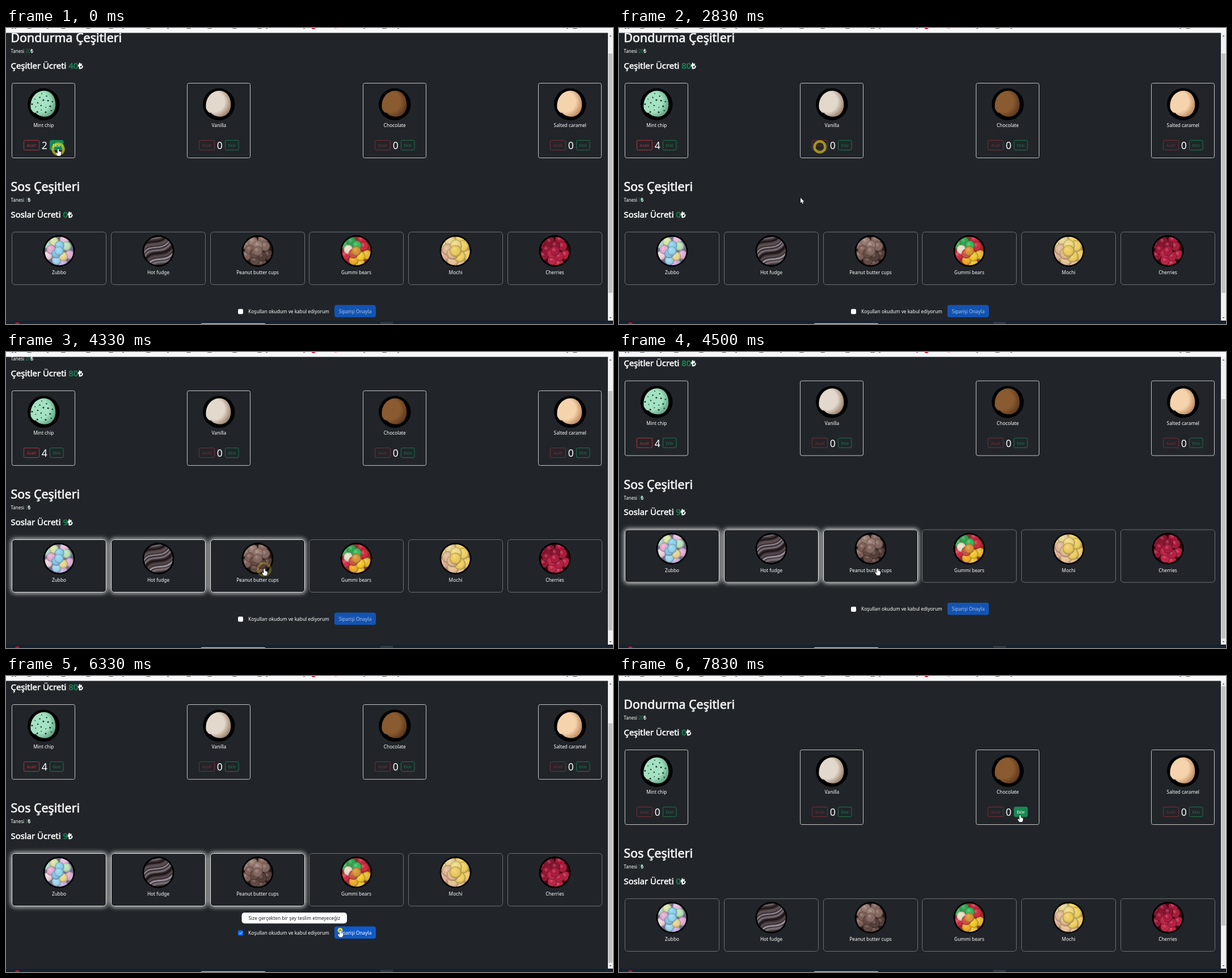
Write an HTML page with a canvas that moves like this. It is 1070 px wide and 523 px high and loops after 8000 ms.

```html
<!DOCTYPE html>
<html lang="tr">
<head>
<meta charset="utf-8">
<title>Dondurma Çeşitleri</title>
<style>
html, body { margin: 0; width: 100%; height: 100%; overflow: hidden; background: #212529; }
canvas { display: block; }
</style>
</head>
<body>
<canvas id="stage" width="1070" height="523"></canvas>
<script>
const ctx = document.getElementById('stage').getContext('2d');
const LOOP = 8000, STEPS = 48, RESET = 40;
const BG = '#212529', GREEN = '#198754', RED = '#dc3545';

const scoops = [
  { name: 'Mint chip', light: '#a3e2c2', dark: '#4f9273', chips: true },
  { name: 'Vanilla', light: '#e2d8cc', dark: '#85684c' },
  { name: 'Chocolate', light: '#8a5a30', dark: '#4f2f17' },
  { name: 'Salted caramel', light: '#f5d3ad', dark: '#ad7444' }
];
// Blob colours run along a spiral from the centre outwards.
const sauces = [
  { name: 'Zubbo', size: 8.2, base: '#6d6a8c', blobs: ['#8fd3ee', '#7fbfe6', '#86cfee', '#e9d48a', '#e6a9cf', '#b9dfb4', '#9fd3ee', '#d9e3a2', '#dfa6d6', '#ead0dc', '#e3b9d8', '#c7a9e0', '#a9d8c4'] },
  { name: 'Hot fudge', base: '#40363a' },
  { name: 'Peanut butter cups', size: 8.8, base: '#2a1b18', blobs: ['#80625a', '#5c403a', '#94766c', '#4d342f', '#7a594f'] },
  { name: 'Gummi bears', size: 8.5, base: '#a02a2a', blobs: ['#d8902e', '#d04a38', '#2fb552', '#f2c81e', '#e6dcc4', '#d02235', '#f0a81c', '#2a9d48', '#e2b52c', '#d0233a', '#c41f38', '#e8c028', '#3cb45a'] },
  { name: 'Mochi', size: 10.5, base: '#a87c48', blobs: ['#ecca58', '#e6b98a', '#efd67c', '#f0cf5c', '#dfb48e', '#eece5a', '#e8c090', '#e4cf8c', '#edc95c', '#dda88c'] },
  { name: 'Cherries', size: 8.5, base: '#43030f', blobs: ['#ab0f33', '#c01a3e', '#860926', '#b51439', '#98092b'] }
];

// Pointer keys: step, x, y
const path = [
  [0, 92, 214], [4, 91, 213], [5, 200, 214], [6, 330, 212], [7, 397, 208], [9, 396, 207],
  [10, 388, 207], [11, 366, 212], [12, 356, 210], [16, 354, 210], [17, 320, 300], [18, 270, 395],
  [20, 143, 397], [21, 190, 398], [22, 344, 400], [23, 440, 395], [24, 455, 384], [28, 456, 382],
  [30, 420, 452], [32, 413, 453], [34, 450, 455], [37, 588, 450], [39, 590, 449], [40, 690, 360],
  [41, 711, 331], [42, 711, 331], [43, 755, 340], [45, 725, 270], [46, 707, 246]
];
const clicks = [-1, 2, 4, 7, 9, 10, 12, 14, 16, 18, 20, 24, 31, 38];

function pointer(step) {
  const next = path.findIndex(p => p[0] >= step);
  if (next <= 0) return path[next < 0 ? path.length - 1 : 0].slice(1);
  const [a, ax, ay] = path[next - 1], [b, bx, by] = path[next];
  const f = (step - a) / (b - a);
  return [ax + (bx - ax) * f, ay + (by - ay) * f];
}

const passed = (step, ...marks) => marks.filter(m => m <= step).length;

function scrollAt(step) {
  if (step >= RESET) return 0;
  return step < 26 ? 33 : step === 26 ? 62 : step === 27 ? 79.5 : 80;
}

function stateAt(step) {
  const done = step >= RESET;
  return {
    counts: done ? [0, 0, 0, 0] : [2 + passed(step, 2, 4), passed(step, 7, 9, 10) - passed(step, 12, 14, 16), 0, 0],
    picked: [22, 19, 24].map(s => !done && step >= s),
    agreed: !done && step >= 32,
    tip: step >= 31 && step < RESET
  };
}

function box(x, y, w, h, r, fill, stroke) {
  ctx.beginPath();
  ctx.roundRect(x, y, w, h, r);
  if (fill) { ctx.fillStyle = fill; ctx.fill(); }
  if (stroke) { ctx.strokeStyle = stroke; ctx.stroke(); }
}

function disc(x, y, r, fill) {
  ctx.beginPath();
  ctx.arc(x, y, r, 0, 7);
  ctx.fillStyle = fill;
  ctx.fill();
}

function text(str, x, y, size, color = '#fff', align = 'left', weight = 0) {
  ctx.font = `${size}px "Noto Sans", "Open Sans", sans-serif`;
  ctx.textAlign = align;
  ctx.fillStyle = ctx.strokeStyle = color;
  ctx.fillText(str, x, y);
  if (weight) {
    ctx.lineWidth = weight;
    ctx.strokeText(str, x, y);
    ctx.lineWidth = 1;
  }
  return x + ctx.measureText(str).width;
}

function price(label, value, y, size, weight) {
  let x = text(label + ' ', 8.5, y, size, '#fff', 'left', weight);
  x = text(value, x, y, size, GREEN, 'left', weight);
  text('₺', x, y, size, '#fff', 'left', weight + 0.3);
}

const heading = (str, y) => text(str, 8.5, y, 21.4, '#f6f6f6', 'left', 0.7);

function at(x, y, draw) {
  ctx.save();
  ctx.translate(x, y);
  draw();
  ctx.restore();
}

const spiral = (i, spread) => {
  const a = i * 2.4, r = spread * Math.sqrt(i);
  return [r * Math.cos(a), r * Math.sin(a)];
};

function drawScoop({ light, dark, chips }) {
  disc(0, 0, 28.3, '#000');
  const shade = ctx.createRadialGradient(-9, -5, 8, -7, -4, 33);
  shade.addColorStop(0, light);
  shade.addColorStop(0.4, light);
  shade.addColorStop(1, dark);
  ctx.beginPath();
  ctx.moveTo(-22.5, 8);
  ctx.bezierCurveTo(-25, -12, -12, -24, 1, -24);
  ctx.bezierCurveTo(15, -24, 22, -10, 21, 3);
  ctx.bezierCurveTo(20, 15, 12, 22, 2, 22);
  ctx.bezierCurveTo(-6, 22, -12, 18, -14, 15);
  ctx.bezierCurveTo(-18, 16, -20, 12, -22.5, 8);
  ctx.fillStyle = shade;
  ctx.fill();
  if (chips) for (let i = 1; i < 18; i++) {
    const [x, y] = spiral(i, 4.7);
    disc(x - 1, y - 1, 0.9 + i % 3 * 0.3, '#1d3a30');
  }
}

function drawSauce({ base, blobs, size }) {
  disc(0, 0, 28, '#000');
  ctx.beginPath();
  ctx.arc(0, 0, 25.2, 0, 7);
  ctx.clip();
  ctx.fillStyle = base;
  ctx.fillRect(-28, -28, 56, 56);
  if (blobs) {
    for (let i = 12; i >= 0; i--) {
      const [x, y] = spiral(i, 7);
      const gloss = ctx.createRadialGradient(x - size * 0.3, y - size * 0.4, 0, x, y, size);
      gloss.addColorStop(0, 'rgba(255,255,255,.3)');
      gloss.addColorStop(0.55, 'rgba(255,255,255,0)');
      gloss.addColorStop(1, 'rgba(0,0,0,.35)');
      disc(x, y, size, blobs[i % blobs.length]);
      disc(x, y, size, gloss);
    }
    return;
  }
  ctx.rotate(-0.35);
  for (let i = 0; i < 10; i++) {
    const y = -25 + i * 5.5;
    ctx.beginPath();
    ctx.moveTo(-28, y + 6);
    ctx.bezierCurveTo(-10, y - 14, 4, y + 16, 28, y - 4);
    ctx.lineWidth = 2 + i % 3;
    ctx.strokeStyle = ['#756c73', '#211819', '#5a4e51', '#969098'][i % 4];
    ctx.stroke();
  }
}

function drawButton(label, x, color, hot, enabled) {
  const w = label === 'Ekle' ? 23.5 : 27;
  ctx.globalAlpha = !enabled ? 0.45 : hot ? 1 : 0.8;
  box(x, 231.5, w, 17, 2, hot && enabled && color, color);
  text(label, x + w / 2, 243.1, 7.25, hot && enabled ? '#fff' : color, 'center');
  ctx.globalAlpha = 1;
}

const inside = ([px, py], x, y, w, h) => px >= x && px <= x + w && py >= y && py <= y + h;
const scoopX = i => 10.5 + Math.round(i * 309.3);
const sauceX = i => 10.5 + Math.round(i * 174.75);

function clickable(p) {
  return scoops.some((s, i) => inside(p, scoopX(i) + 21, 232, 27, 17) || inside(p, scoopX(i) + 67, 232, 24, 17)) ||
    sauces.some((s, i) => inside(p, sauceX(i), 393, 166, 94)) ||
    inside(p, 408, 522, 244, 22);
}

function drawPage(state, hover) {
  heading('Dondurma Çeşitleri', 57.7);
  price('Tanesi', 20, 77, 8, 0);
  price('Çeşitler Ücreti', 20 * state.counts.reduce((a, b) => a + b), 104.6, 14.9, 0.55);
  scoops.forEach((scoop, i) => {
    const x = scoopX(i), n = state.counts[i];
    box(x, 130.5, 111, 132, 3, null, '#c4c5c6');
    at(x + 55.8, 167.8, () => drawScoop(scoop));
    text(scoop.name, x + 55.8, 208, 8.31, '#fff', 'center');
    drawButton('Azalt', x + 21, RED, inside(hover, x + 21, 232, 27, 17), n > 0);
    text(n, x + 57.3, 247.3, 17.5, '#fff', 'center');
    drawButton('Ekle', x + 67, GREEN, inside(hover, x + 67, 232, 24, 17), true);
  });

  heading('Sos Çeşitleri', 321);
  price('Tanesi', 3, 340, 8, 0);
  price('Soslar Ücreti', 3 * state.picked.filter(Boolean).length, 367.7, 14.9, 0.55);
  sauces.forEach((sauce, i) => {
    const x = sauceX(i), on = state.picked[i];
    if (on) {
      ctx.shadowColor = '#fff';
      ctx.shadowBlur = 9;
      box(x - 1, 392.5, 168, 95, 6, BG);
      ctx.shadowBlur = 0;
    }
    box(x, 393.5, 166, 93, 5, on && BG, on ? '#fff' : '#6c6f72');
    at(x + 83, 427, () => drawSauce(sauce));
    text(sauce.name, x + 83, 468.4, 8.31, '#fff', 'center');
  });

  box(409, 529.5, 9, 9, 2, state.agreed ? '#0d6efd' : '#fff');
  if (state.agreed) {
    ctx.beginPath();
    ctx.moveTo(411.3, 534.2);
    ctx.lineTo(413, 535.9);
    ctx.lineTo(416, 532.4);
    ctx.strokeStyle = '#fff';
    ctx.stroke();
  }
  text('Koşulları okudum ve kabul ediyorum', 427, 536.5, 8.31);
  const hot = state.agreed && inside(hover, 579, 522, 73, 22);
  ctx.globalAlpha = state.agreed ? 1 : 0.65;
  box(579, 522.5, 73, 21.5, 3.5, hot ? '#0f5acb' : '#0d6efd');
  text('Siparişi Onayla', 615.5, 536.5, 8.31, '#fff', 'center');
  ctx.globalAlpha = 1;
  if (state.tip) {
    box(415.5, 498, 185.5, 19.3, 5, '#fff');
    text('Size gerçekten bir şey teslim etmeyeceğiz', 508.3, 511, 8.35, BG, 'center');
  }
}

function triangle(x, y, dir) {
  ctx.beginPath();
  ctx.moveTo(x - 2, y + dir);
  ctx.lineTo(x + 2, y + dir);
  ctx.lineTo(x, y - dir);
  ctx.fillStyle = '#505050';
  ctx.fill();
}

function drawChrome(scroll) {
  ctx.fillStyle = '#f1f1f1';
  ctx.fillRect(1061, 8, 9, 509);
  ctx.fillStyle = '#c1c1c1';
  ctx.fillRect(1062, 18 + scroll * 0.82, 7, 423);
  triangle(1065.5, 14, 1);
  triangle(1065.5, 512, -1);

  ctx.fillStyle = '#f8f8fa';
  ctx.fillRect(0, 0, 1070, 8.6);
  for (const x of [41, 101, 145, 185, 251, 322, 359, 403, 447, 667, 1003]) box(x - 4, -4, 8, 4.5, 1, null, '#55585c');
  ctx.fillStyle = '#77797d';
  for (const x of [10, 15, 72, 205, 284, 458, 524, 630, 690, 988]) ctx.fillRect(x, 0, 3, 1.3);
  disc(542, -2, 4, '#e2062c');
  disc(581, -3, 4, '#f09a90');

  ctx.fillStyle = '#16222d';
  ctx.fillRect(0, 517, 1070, 6);
  ctx.fillStyle = '#2b3742';
  ctx.fillRect(660, 519, 22, 4);
  disc(20, 524, 4, '#d8052c');
  box(343, 521.8, 115, 6, 3, '#d9c3cb');
}

const hand = 'M-1.2 .8Q0-.8 1.1 .8L1.3 4Q5.2 4.6 5.3 6.3L5 9.3 3.8 12H-1.2L-4 8Q-4.2 6.3-2.8 6.6L-1.2 8Z';
const arrow = 'M0 0V9L2 7.2 3.5 10.5 5 9.9 3.6 6.7H6.3Z';

function drawPointer(step, pos, overLink) {
  const click = clicks.filter(c => c <= step).pop();
  const ring = [[3, 1, 3], [9.5, 0.6, 4.5], [11, 0.27, 4]][step - click];
  if (ring) {
    const [radius, alpha, width] = ring;
    ctx.beginPath();
    ctx.arc(...pointer(click), radius, 0, 7);
    ctx.lineWidth = width;
    ctx.strokeStyle = `rgba(238,225,20,${alpha})`;
    ctx.stroke();
  }
  at(...pos, () => {
    const shape = new Path2D(overLink ? hand : arrow);
    ctx.lineWidth = 1;
    ctx.strokeStyle = '#111';
    ctx.stroke(shape);
    ctx.fillStyle = '#fff';
    ctx.fill(shape);
  });
}

function draw(step) {
  const scroll = scrollAt(step), pos = pointer(step);
  const toPage = ([x, y]) => [x, y + scroll];
  ctx.lineWidth = 1;
  ctx.fillStyle = BG;
  ctx.fillRect(0, 0, 1070, 523);
  // Button colours trail the pointer by one step.
  at(0, -scroll, () => drawPage(stateAt(step), toPage(pointer(step - 1))));
  drawChrome(scroll);
  drawPointer(step, pos, clickable(toPage(pos)));
}

let shown = -1;
function tick() {
  const step = Math.floor((performance.now() % LOOP + 4) * STEPS / LOOP) % STEPS;
  if (step !== shown) draw(shown = step);
  requestAnimationFrame(tick);
}
tick();
</script>
</body>
</html>
```
